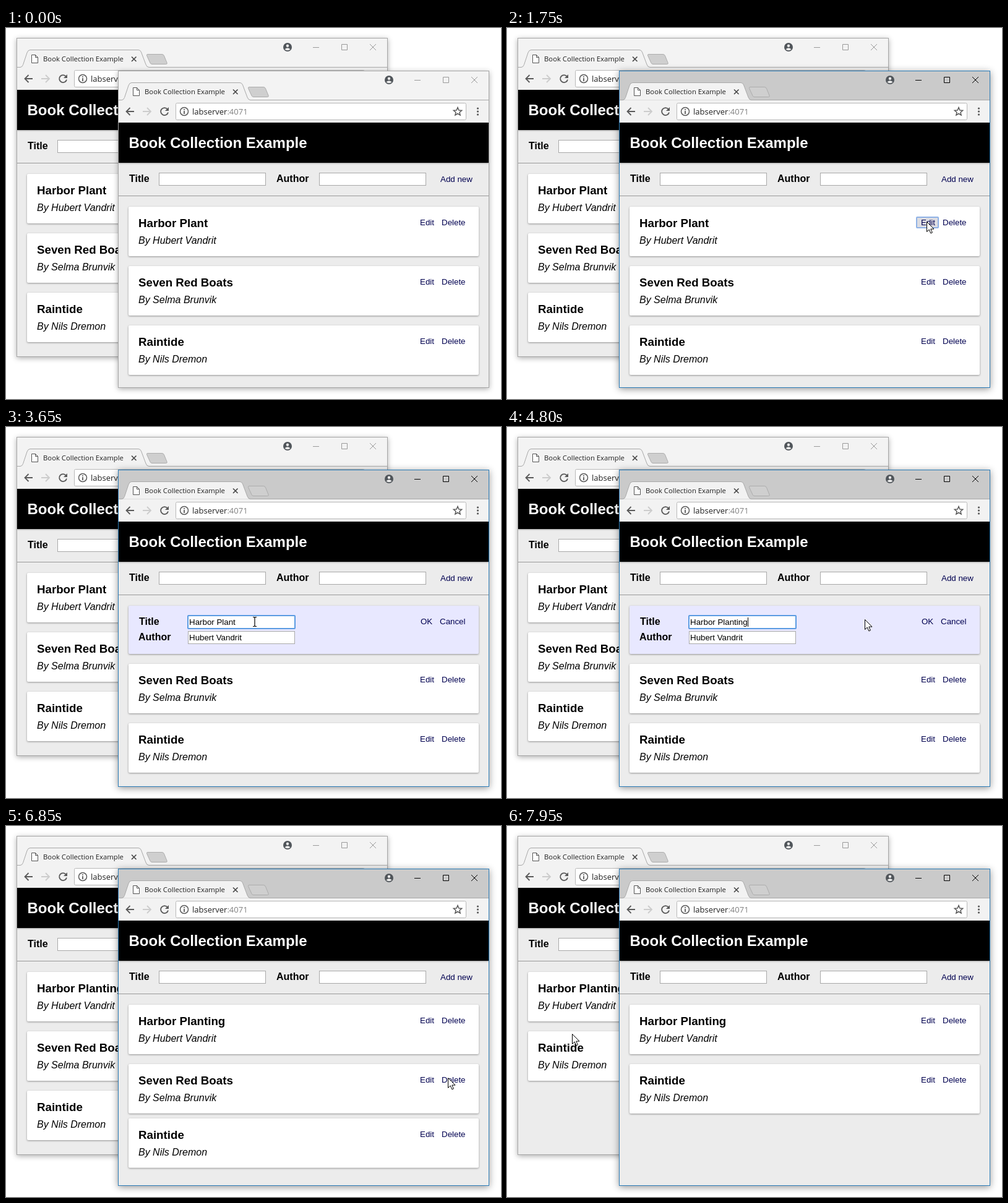
An HTML page for the animation above (8000 ms loop, 800x600 px).

```html
<!DOCTYPE html>
<html lang="en">
<head>
<meta charset="utf-8">
<title>Book Collection Example</title>
<style>
html, body { margin: 0; width: 100%; height: 100%; overflow: hidden; background: #fff; }
#stage { display: block; width: 800px; height: 600px; font: 13.333px "Liberation Sans", Arial, sans-serif; }
#stage text { white-space: pre; }
.frame { fill: #ececec; stroke: #a6a6a6; filter: drop-shadow(0 2px 4px rgba(0,0,0,.32)); }
.edge { fill: none; stroke: #a6a6a6; }
.titlebar { fill: #f3f3f3; }
.controls { fill: none; stroke: #9a9a9a; }
.active .frame { filter: drop-shadow(0 2px 6px rgba(0,0,0,.42)); }
.active .edge { stroke: #2b7cb8; }
.active .titlebar { fill: #cacaca; }
.active .controls { stroke: #000; }
.ui { font-family: "Open Sans", "Noto Sans", sans-serif; }
.icon { fill: none; stroke: #5a5a5a; stroke-width: 1.8; }
.header { filter: drop-shadow(0 1px 1px rgba(0,0,0,.3)); }
h1, .h1 { font-weight: bold; font-size: 24px; fill: #fff; }
.label { font-weight: bold; font-size: 16px; }
.h3 { font-weight: bold; font-size: 18.72px; }
.by { font-style: italic; font-size: 16px; }
.link { fill: #000050; }
.input { fill: #fff; stroke: #a9a9a9; }
.paper { fill: #fff; filter: drop-shadow(0 1px 1.5px rgba(0,0,0,.38)); }
.press { fill: #dddde2; stroke: #8fb2e6; stroke-width: 2; }
.ring { fill: none; stroke: #5b9be2; stroke-width: 2; }
</style>
</head>
<body>
<svg id="stage" viewBox="0 0 800 600"></svg>
<script>
const LOOP = 8000;
const EDIT_OPEN = 2100, EDIT_SAVED = 5550;
const CARD_TOP = 289, CARD_H = 80, CARD_STEP = 96;
const FADE = 500, COLLAPSE = 510;
const TITLE = 'Harbor Plant', WRITER = 'Hubert Vandrit';
const BOOKS = [[TITLE, WRITER], ['Seven Red Boats', 'Selma Brunvik'], ['Raintide', 'Nils Dremon']];
const KEY_TIMES = [3950, 4050, 4200];

// Pointer moves: start, end, from x, y, to x, y, vertical bend
const MOVES = [
  [550, 1400, 0, 424, 678, 313, -45],
  [2200, 2600, 678, 313, 402, 315, 0],
  [4350, 5110, 402, 315, 678, 313, -3],
  [5550, 5900, 678, 313, 674, 310, 0],
  [6050, 6600, 674, 310, 714, 407, 0],
  [7300, 7950, 714, 407, 105, 336, 0]
];
// Pressed buttons: start, end, x, y, width
const PRESSES = [
  [1650, EDIT_OPEN, 662, 306, 35],
  [5200, EDIT_SAVED, 663, 306, 33],
  [6700, 6850, 697, 402, 52]
];

const text = (x, y, cls, s) => `<text x="${x}" y="${y}" class="${cls}">${s}</text>`;
const rect = (x, y, w, h, attrs) => `<rect x="${x}" y="${y}" width="${w}" height="${h}" ${attrs}/>`;
const path = (d, attrs = '') => `<path d="${d}" ${attrs}/>`;
const input = (x, y) => rect(x + .5, y + .5, 172, 20, 'class="input"');

function chrome() {
  return rect(182, 70, 598, 47, 'class="titlebar"')
    + path('M182 116.5H187Q190 116.5 191.5 112.5L198 93Q199.5 88.5 203 88.5H378Q381 88.5 382.5 92L390 112Q391.5 116.5 395 116.5H780', 'fill="#f2f2f2" stroke="#a9a9a9"')
    + rect(182, 117, 598, 37, 'fill="#f2f2f2"')
    + path('M393 95.5H416Q418.5 95.5 419.5 98L424 109Q425 111.5 422.5 111.5H400Q398 111.5 397 109.5L391.5 97.5Q391 95.5 393 95.5Z', 'fill="#cfcfcf" stroke="#adadad"')
    + path('M205.5 96.5H211.5L215.5 100.5V109.5H205.5ZM211.5 96.5V100.5H215.5', 'fill="#fff" stroke="#555"')
    + `<text x="224" y="107" class="ui" font-size="11.3" fill="#222">Book Collection Example</text>`
    + path('M367 99.5L374.500 107M374.500 99.5L367 107', 'stroke="#444" stroke-width="1.6"')
    + '<circle cx="619" cy="84" r="7" fill="#50555a"/><circle cx="619" cy="81.700" r="2.200" fill="#eee"/>'
    + path('M614.500 87.500Q619 83 623.500 87.500Q619 91 614.500 87.500Z', 'fill="#eee"')
    + path('M660 84.5H670M706.5 79.5H715.5V88.5H706.5ZM752 79L762 89M762 79L752 89', 'class="controls"')
    + path('M207 135H195M200.500 129L194.500 135L200.500 141', 'class="icon"')
    + path('M221 135H233M228 129L234 135L228 141', 'class="icon" style="stroke:#ccc"')
    + path('M261 131.500A6 6 0 1 0 262 136.500', 'class="icon"')
    + path('M263 128V134H257Z', 'fill="#5a5a5a"')
    + rect(274.5, 121.5, 469, 27, 'rx="2" fill="#fff" stroke="#b8b8b8"')
    + '<circle cx="288" cy="135" r="6.500" class="icon" style="stroke-width:1.5"/>'
    + path('M288 134V139M288 131V132.700', 'class="icon"')
    + '<text x="301" y="140" class="ui" font-size="13" fill="#222">labserver<tspan fill="#808080">:4071</tspan></text>'
    + path('M730 128.500L731.900 133L736.600 133.300L733 136.400L734.100 141L730 138.500L725.900 141L727 136.400L723.400 133.300L728.100 133Z', 'class="icon" style="stroke-width:1.5"')
    + [130, 135, 140].map(y => `<circle cx="762.500" cy="${y}" r="1.600" fill="#5a5a5a"/>`).join('');
}

function card([title, writer]) {
  return `<g class="card">${rect(198, 0, 566, CARD_H, 'rx="2" class="paper"')}
    <svg class="body" x="198" y="0" width="566" height="${CARD_H}" viewBox="0 0 566 ${CARD_H}" preserveAspectRatio="xMinYMin slice">
    ${text(16, 33, 'h3', title)}${text(16, 60, 'by', 'By ' + writer)}
    ${text(471, 30, 'link', 'Edit')}${text(506, 30, 'link', 'Delete')}</svg></g>`;
}

function editor() {
  return `<g class="editor">${text(215, 320, 'label', 'Title')}${text(214, 345, 'label', 'Author')}
    ${input(294, 305)}${input(294, 330)}${text(296, 320, 'typed', TITLE)}${text(296, 345, '', WRITER)}
    ${text(670, 319, 'link', 'OK')}${text(701, 319, 'link', 'Cancel')}
    ${rect(294, 305, 173, 21, 'rx="1" class="ring"')}${rect(0, 308, 1, 15, 'class="caret"')}</g>`;
}

function browser(id, x, y, height) {
  return `<g id="${id}" transform="translate(${x} ${y})">
    ${rect(181.5, 69.5, 599, height - 1, 'class="frame"')}${chrome()}
    ${rect(182, 271, 598, 1, 'fill="#999"')}
    ${rect(182, 153, 598, 65, 'class="header"')}${text(198.5, 194, 'h1', 'Book Collection Example')}
    ${text(199, 249, 'label', 'Title')}${input(247, 234)}
    ${text(437, 249, 'label', 'Author')}${input(506, 234)}${text(702, 249, 'link', 'Add new')}
    ${BOOKS.map(card).join('')}${editor()}
    ${rect(181.5, 69.5, 599, height - 1, 'class="edge"')}</g>`;
}

const stage = document.getElementById('stage');
stage.innerHTML = browser('back', -164, -53, 516) + browser('front', 0, 0, 513)
  + `<g id="pointer">${path('M.5 .5V16.500L4.200 13L6.900 19L9.400 17.900L6.800 12.100H12Z', 'id="arrow" fill="#fff" stroke="#000"')}
    ${path('M-3 -7.500H-1L0 -6.500L1 -7.500H3M0 -6.500V6.500M-3 7.500H-1L0 6.500L1 7.500H3', 'id="beam" fill="none" stroke="#000" stroke-width="1.200"')}</g>`;

const find = (root, sel) => root.querySelector(sel);
const show = (el, on) => { el.style.display = on ? '' : 'none'; };
const clamp = k => Math.max(0, Math.min(1, k));
const between = (t, a, b) => t >= a && t < b;

function parts(id) {
  const root = document.getElementById(id);
  const cards = [...root.querySelectorAll('.card')].map(el => ({
    el, paper: find(el, '.paper'), body: find(el, '.body'), title: find(el, '.h3')
  }));
  return { root, cards, editor: find(root, '.editor') };
}
const back = parts('back'), front = parts('front');
const typed = find(front.editor, '.typed');
const ring = find(front.editor, '.ring');
const caret = find(front.editor, '.caret');
const [pointer, arrow, beam] = ['pointer', 'arrow', 'beam'].map(id => document.getElementById(id));

const buttons = PRESSES.map(([, , x, y, w], i) => {
  const el = document.createElementNS('http://www.w3.org/2000/svg', 'rect');
  const attrs = { x, y, width: w, height: 17, rx: 1, class: 'press' };
  for (const name in attrs) el.setAttribute(name, attrs[name]);
  // Sits below the link text of its card
  if (i === 1) front.editor.prepend(el);
  else {
    el.setAttribute('y', y - CARD_TOP - i / 2 * CARD_STEP);
    const { paper } = front.cards[i / 2];
    paper.after(el);
  }
  return el;
});

function setHeight(part, h) {
  part.paper.setAttribute('height', h);
  part.body.setAttribute('height', h);
  part.body.setAttribute('viewBox', `0 0 566 ${h}`);
}

function drawList(win, t, fadeStart, collapseStart, editing) {
  const [first, second, third] = win.cards;
  const saved = t >= EDIT_SAVED;
  const firstH = editing ? 78 : CARD_H;
  setHeight(first, firstH);
  show(first.body, !editing);
  show(win.editor, editing);
  first.title.textContent = saved ? TITLE + 'ing' : TITLE;
  first.title.style.opacity = saved ? clamp((t - fadeStart) / FADE) : 1;

  const k = clamp((t - collapseStart) / COLLAPSE);
  const h = CARD_H * (1 - k) ** 2;
  const gap = k > 0 ? Math.min(8, 40 * (1 - k)) : 16;
  show(second.el, k < 1);
  if (k < 1) setHeight(second, h);
  second.el.style.opacity = 1 - k;

  const secondY = CARD_TOP + firstH + 16;
  [CARD_TOP, secondY, secondY + h + gap].forEach((y, i) =>
    win.cards[i].el.setAttribute('transform', `translate(0 ${y})`));
}

function drawEditor(t) {
  const tint = t < EDIT_SAVED ? clamp((t - EDIT_OPEN) / 150) : 1 - clamp((t - EDIT_SAVED) / 200);
  front.cards[0].paper.style.fill = `rgb(${255 - 23 * tint},${255 - 23 * tint},255)`;
  typed.textContent = TITLE + 'ing'.slice(0, KEY_TIMES.filter(k => t >= k).length);
  const focused = between(t, 2950, 5200);
  show(ring, focused);
  show(caret, focused && Math.floor((t - 3700) / 500) % 2 === 0);
  if (focused) caret.setAttribute('x', Math.round(296 + typed.getComputedTextLength()));
}

function drawPointer(t) {
  const move = MOVES.filter(m => t >= m[0]).pop();
  show(pointer, move && !between(t, KEY_TIMES[0], 4350));
  if (!move) return;
  const [start, end, x0, y0, x1, y1, bend] = move;
  const k = clamp((t - start) / (end - start));
  const e = k * k * (3 - 2 * k);
  const x = x0 + (x1 - x0) * e;
  const y = y0 + (y1 - y0) * e + bend * 4 * e * (1 - e);
  const overInput = between(t, EDIT_OPEN, EDIT_SAVED) && x > 294 && x < 467;
  show(beam, overInput);
  show(arrow, !overInput);
  pointer.setAttribute('transform', `translate(${Math.round(x)} ${Math.round(y)})`);
}

function draw(t) {
  front.root.setAttribute('class', t >= 1650 ? 'active' : '');
  drawList(back, t, 5500, 6911, false);
  drawList(front, t, 5550, 6850, between(t, EDIT_OPEN, EDIT_SAVED));
  drawEditor(t);
  buttons.forEach((el, i) => show(el, between(t, PRESSES[i][0], PRESSES[i][1])));
  drawPointer(t);
}

const began = performance.now();
function tick() {
  draw((performance.now() - began) % LOOP);
  requestAnimationFrame(tick);
}
tick();
</script>
</body>
</html>
```
